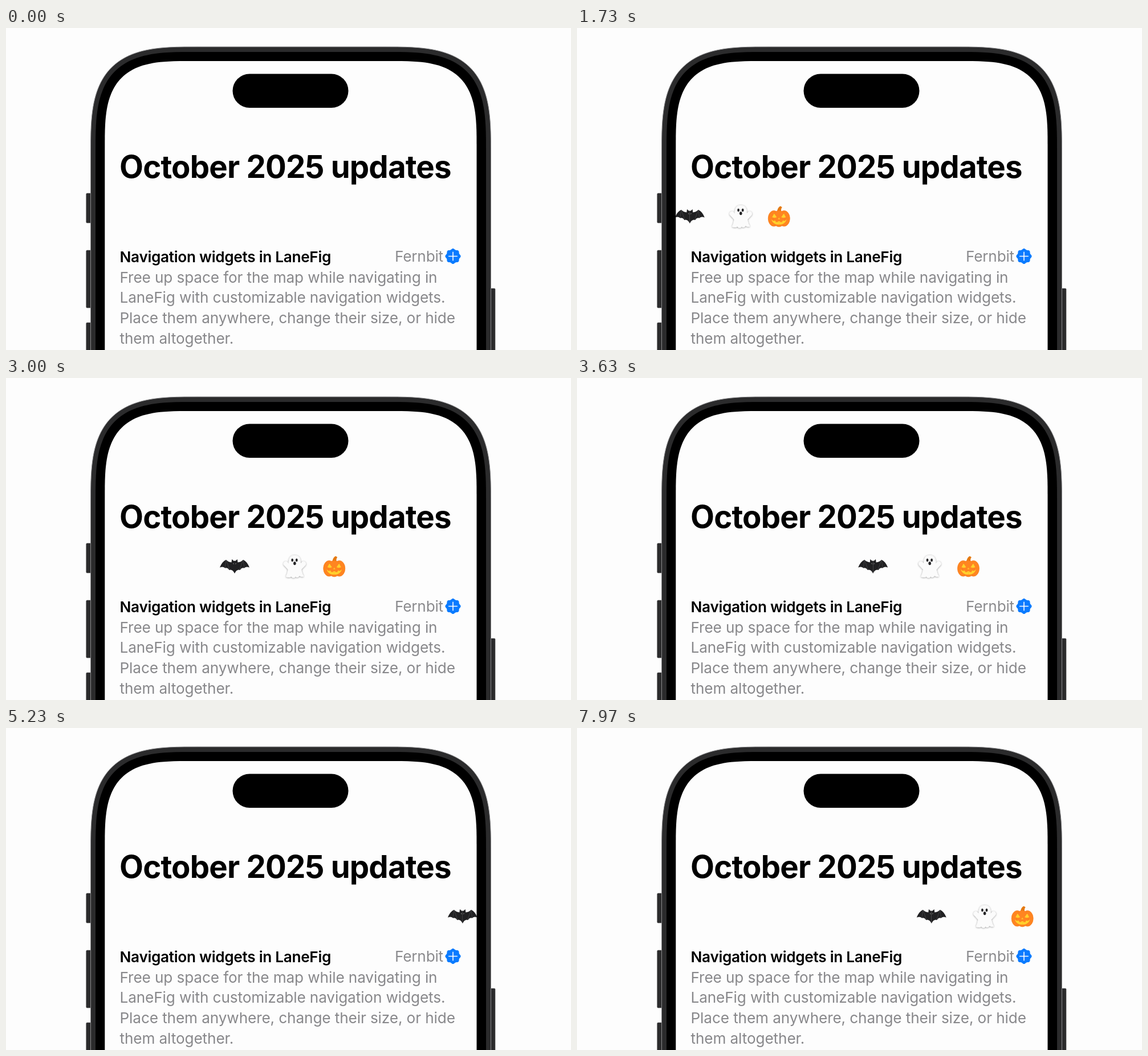
Recreate the animation shown at these times as an HTML page. Size 991 by 565 pixels, loop 8000 ms.

```html
<!DOCTYPE html>
<html lang="en">
<head>
<meta charset="utf-8">
<title>October 2025 updates</title>
<style>
  html, body { margin: 0; width: 100%; height: 100%; overflow: hidden; background: #fdfdfd; }
  svg { display: block; width: 991px; height: 565px; }
  text { font-family: Inter, "Liberation Sans", sans-serif; font-size: 26.2px; }
  .title { font-size: 54.5px; font-weight: 700; letter-spacing: -.8px; }
  .head { font-weight: 600; letter-spacing: -.3px; }
  .body { fill: #88888b; letter-spacing: -.12px; }
  .tag { fill: #8b8b8e; letter-spacing: -.2px; text-anchor: end; }
</style>
</head>
<body>
<svg viewBox="0 0 991 565">
  <defs>
    <clipPath id="screen"><rect x="173" y="58" width="653" height="507"/></clipPath>
    <filter id="soft" x="-30%" y="-30%" width="160%" height="160%">
      <feDropShadow dx="0" dy=".6" stdDeviation="1.6" flood-opacity=".45"/>
    </filter>
    <g id="wing">
      <path d="M0-9.300H1.800L4.800-12L5.500-6.500Q11-7 15-11Q22-8 26 2.500Q20 0 17 3.500Q12 2 9.500 7Q4 5 0 13Z"/>
      <path d="M15-10L17 3M14.500-10L9 6" stroke="#4a4a4d" stroke-width=".7"/>
      <path d="M2.800-4.500l-1.800.8" stroke="#8a8a8a"/>
    </g>
    <path id="grin" d="M4 1L8.500-5.500L12 1Q8 3 4 1ZM0 1.500L1.800 4.500H0ZM0 8H1.500L2 9.500H5.500L6.500 6.700L9.500 7.500L13.500 5Q10 14.500 0 14Z"/>
  </defs>

  <g fill="#2b2b2c" stroke="#555" stroke-width=".6">
    <rect x="140.700" y="290" width="10" height="52" rx="1.500"/>
    <rect x="140.700" y="390" width="10" height="101" rx="1.500"/>
    <rect x="140.700" y="517" width="10" height="60" rx="1.500"/>
    <rect x="848" y="457" width="10" height="120" rx="1.500"/>
  </g>
  <g id="shell"></g>
  <rect x="397.500" y="80.500" width="203" height="59.500" rx="29.750"/>

  <text class="title" x="199" y="263">October 2025 updates</text>
  <text class="head" x="199.500" y="410.500">Navigation widgets in LaneFig</text>
  <text class="tag" x="767" y="410">Fernbit</text>
  <g class="body">
    <text x="199.500" y="446.500">Free up space for the map while navigating in</text>
    <text x="199.500" y="482.300">LaneFig with customizable navigation widgets.</text>
    <text x="199.500" y="518.100">Place them anywhere, change their size, or hide</text>
    <text x="199.500" y="553.900">them altogether.</text>
  </g>
  <g transform="translate(784 400.500)">
    <path id="seal" fill="#0a7bff"/>
    <path d="M-7.300 0H7.300M0-7.300V7.300" stroke="#fff" stroke-width="1.600" stroke-linecap="round"/>
  </g>

  <g clip-path="url(#screen)">
    <g id="bat" fill="#202022">
      <use href="#wing"/><use href="#wing" transform="scale(-1 1)"/>
    </g>
    <g id="ghost">
      <g filter="url(#soft)" fill="#fbfbfb">
        <path d="M-9 2L-15.500-5M9 2L15.500-5" stroke="#fbfbfb" stroke-width="8" stroke-linecap="round"/>
        <path d="M0-20Q10-20 10.500-8Q11 10 16 17Q12 19 8.500 16Q5 21 1.500 17.500Q-2 22-6 17.500Q-10 20-15.500 17.500Q-11 10-10.500-8Q-10-20 0-20Z"/>
      </g>
      <g fill="#252527">
        <ellipse cx="-4.200" cy="-11.500" rx="1.900" ry="2.700"/>
        <ellipse cx="3.400" cy="-11.500" rx="1.900" ry="2.700"/>
        <ellipse cy="-5.800" rx="2.300" ry="3"/>
      </g>
    </g>
    <g id="pumpkin">
      <path fill="#e57a13" d="M-3.500-9Q-2-17 2.500-18.500L5.500-16.500Q3-14 4-9Z"/>
      <g fill="#ff8521" stroke="#f57c1a" stroke-width=".7">
        <ellipse cx="-9" cy="3.200" rx="10" ry="13.800"/>
        <ellipse cx="9" cy="3.200" rx="10" ry="13.800"/>
        <ellipse cy="3.500" rx="10.500" ry="14.300"/>
      </g>
      <g fill="#ffd12c"><use href="#grin"/><use href="#grin" transform="scale(-1 1)"/></g>
    </g>
  </g>
</svg>
<script>
const LOOP = 8000, TURN = 6073;
const $ = id => document.getElementById(id);
const path = points => `M${points.map(p => p.map(v => v.toFixed(2)).join(' ')).join('L')}Z`;

// Phone outline: superellipse corners of the given size, open below the stage.
function outline(x0, x1, top, size) {
  const side = Array.from({ length: 41 }, (_, i) => {
    const a = i * Math.PI / 80, bend = v => size * (1 - Math.abs(v) ** (2 / 3.25));
    return [bend(Math.cos(a)), top + bend(Math.sin(a))];
  });
  return path([
    [x0, 600],
    ...side.map(([dx, y]) => [x0 + dx, y]),
    ...side.map(([dx, y]) => [x1 - dx, y]).reverse(),
    [x1, 600]
  ]);
}

function addShell(d, fill, stroke = 'none') {
  const p = document.createElementNS('http://www.w3.org/2000/svg', 'path');
  for (const [k, v] of Object.entries({ d, fill, stroke })) p.setAttribute(k, v);
  $('shell').append(p);
}
addShell(outline(148.5, 850.5, 33, 190), '#2b2b2c', '#8a8a8c');
addShell(outline(157, 842, 42, 177), '#000');
addShell(outline(173.3, 825.5, 58, 153), '#fdfdfd');

// Eight-lobed badge.
$('seal').setAttribute('d', path(Array.from({ length: 96 }, (_, i) => {
  const a = i * Math.PI / 48, r = 12.7 + .9 * Math.cos(8 * a);
  return [r * Math.cos(a), r * Math.sin(a)];
})));

// Each figure sweeps along a sine, fastest at `mid` ms, and retraces it after TURN.
const figures = [
  { id: 'bat', x: 522.8, y: 330, mid: 3650, reach: 443, pace: 2330 },
  { id: 'ghost', x: 577.5, y: 331, mid: 3400, reach: 747, pace: 4183 },
  { id: 'pumpkin', x: 587, y: 331, mid: 3065, reach: 1005, pace: 5709 }
];
function draw(now) {
  const t = now % LOOP, u = t < TURN ? t : 2 * TURN - t;
  for (const { id, x, y, mid, reach, pace } of figures) {
    const px = x + reach * Math.sin((u - mid) / pace);
    $(id).setAttribute('transform', `translate(${px.toFixed(2)} ${y})`);
  }
}
const start = performance.now();
function tick() {
  draw(performance.now() - start);
  requestAnimationFrame(tick);
}
tick();
</script>
</body>
</html>
```
